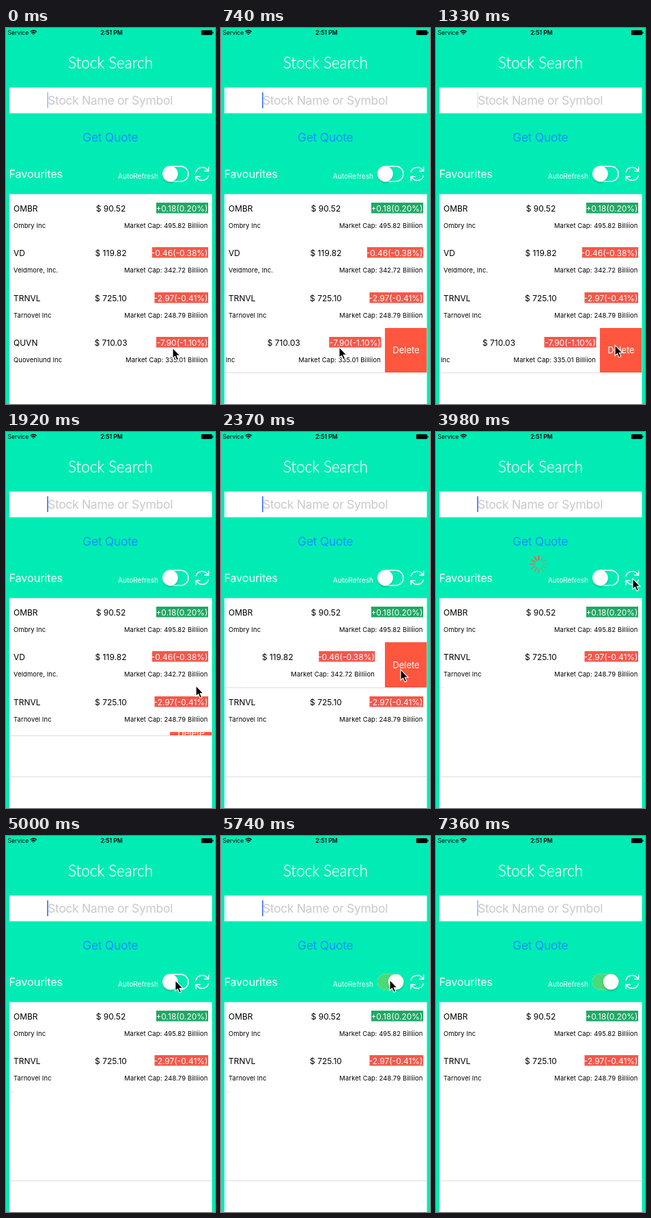
An HTML page that plays this animation: 306 px wide and 549 px high, repeating every 7.46 s.

```html
<!DOCTYPE html>
<html lang="en">
<head>
<meta charset="utf-8">
<title>Stock Search</title>
<style>
html, body { margin: 0; height: 100%; overflow: hidden; background: #00ecb4; }
svg { display: block; overflow: hidden; }
text { font-family: Inter, Roboto, sans-serif; white-space: pre; }
.title { font: 300 22.5px Lato, "Open Sans", sans-serif; fill: #fff; stroke: #fff; stroke-width: .3; }
.big { font-size: 17.6px; letter-spacing: -.02em; }
.row { font-size: 12px; }
.small { font-size: 9.45px; letter-spacing: .01em; }
.end { text-anchor: end; }
.mid { text-anchor: middle; }
.white { fill: #fff; }
.line { fill: none; stroke: #fff; stroke-width: 1.5; }
#thumb { filter: drop-shadow(0 2px 1.2px rgba(0, 0, 0, .2)); }
</style>
</head>
<body>
<svg id="stage" width="306" height="549" viewBox="0 0 306 549">
  <rect width="306" height="549" fill="#00ecb4"/>

  <text x="2.5" y="10" font-size="8.6">Service</text>
  <g fill="none" stroke="#000" stroke-width="1.4">
    <path d="M35.6 5.5Q40.2 1.6 44.8 5.5M37.3 7.4Q40.2 5 43.1 7.4"/>
    <path d="M40.2 10.2L38.8 8.7Q40.2 7.6 41.6 8.7Z" fill="#000" stroke="none"/>
  </g>
  <text class="mid" x="154.5" y="10" font-size="8.6" font-weight="600">2:51 PM</text>
  <rect x="285.8" y="3.3" width="16.2" height="6.9" rx="1"/>
  <rect x="302.4" y="5.6" width="1.2" height="2.6"/>

  <text class="title mid" x="153" y="59.3">Stock Search</text>
  <rect x="5" y="87" width="296.5" height="37.5" fill="#fff"/>
  <text class="big" x="61" y="112" fill="#c9c9cd">Stock Name or Symbol</text>
  <rect id="caret" x="60" y="94" width="2" height="23" fill="#5a86f6"/>
  <text class="big mid" x="152.7" y="166" fill="#128fff">Get Quote</text>

  <text class="white" x="4.5" y="219" font-size="16.2" letter-spacing="-.08">Favourites</text>
  <text class="white end" x="223" y="219.5" font-size="10" letter-spacing=".05">AutoRefresh</text>
  <rect class="line" x="229.7" y="202" width="37.3" height="22" rx="11"/>
  <rect id="track" x="229" y="201.3" width="38.7" height="23.4" rx="11.7" fill="#4cd977"/>
  <circle id="thumb" cy="213" r="11.2" fill="#fff"/>
  <g id="icon" class="line"></g>
  <g id="spinner" stroke="#f5603c" stroke-width="2.1" stroke-linecap="round"></g>

  <rect x="5" y="242.5" width="296.5" height="307" fill="#fff"/>
  <g id="rows"></g>
  <rect id="edge" x="5" height="1" fill="#dcdcde"/>
  <rect id="base" x="5" y="503" width="296.5" height="1" fill="#dcdcde"/>
  <path id="cursor" d="M0 0V15.5L3.5 12.3L6 18L8.7 16.8L6.2 11.3H11Z" fill="#000" stroke="#fff" stroke-width="1.1"/>
</svg>
<script>
const $ = id => document.getElementById(id);
const set = (el, attrs) => { for (const k in attrs) el.setAttribute(k, attrs[k]); };

const LOOP = 7460, STEP = 147.2, ROW = 65.25, TOP = 242, DELETE = 380;

// symbol, company, price, change, market cap, left edge of the change badge
const stocks = [
  ['OMBR', 'Ombry Inc', '90.52', '+0.18(0.20%)', '495.82', 215],
  ['VD', 'Veldmore, Inc.', '119.82', '-0.46(-0.38%)', '342.72', 209],
  ['TRNVL', 'Tarnovel Inc', '725.10', '-2.97(-0.41%)', '248.79', 212.5],
  ['QUVN', 'Quovenlund Inc', '710.03', '-7.90(-1.10%)', '335.01', 215]
];

// The delete button lies under the white sheet and shows as the sheet slides left.
$('rows').innerHTML = stocks.map(([symbol, company, price, change, cap, left]) => `
  <svg x="5" width="296.5">
    <g>
      <rect x="235" width="61.5" height="100%" fill="#ff5640"/>
      <text class="white mid" x="266" y="50%" dy=".36em" font-size="13">Delete</text>
    </g>
    <g>
      <rect width="296.5" height="66" fill="#fff"/>
      <text class="row" x="6" y="25.5">${symbol}</text>
      <text class="row mid" x="148.5" y="25.5">$ ${price}</text>
      <rect x="${left}" y="13" width="${291 - left}" height="15.5" fill="${change[0] === '+' ? '#20a865' : '#f4584c'}"/>
      <text class="row white end" x="290.5" y="25.5">${change}</text>
      <text class="small" x="6" y="49.7">${company}</text>
      <text class="small end" x="290.5" y="49.7">Market Cap: ${cap} Billiion</text>
    </g>
  </svg>`).join('');
const rows = [...$('rows').children];

$('icon').innerHTML = [0, 180].map(a =>
  `<path transform="rotate(${a} 287.3 213)" d="M278 210.6A9.6 9.6 0 0 1 295.6 208.4M296.6 202.4V209H290"/>`).join('');
$('spinner').innerHTML = Array.from({ length: 12 }, (_, i) =>
  `<path transform="translate(150.5 193) rotate(${i * 30})" d="M0 -6.8V-12.2"/>`).join('');
const petals = [...$('spinner').children];

// Each key is [time, ...values]; values move linearly between keys.
function at(t, keys) {
  const i = keys.findIndex(k => k[0] > t);
  if (i < 0) return keys[keys.length - 1].slice(1);
  if (!i) return keys[0].slice(1);
  const a = keys[i - 1], b = keys[i], p = (t - a[0]) / (b[0] - a[0]);
  return a.slice(1).map((v, j) => v + (b[j + 1] - v) * p);
}
const ramp = (t, start, length) => Math.min(1, Math.max(0, (t - start) / length));
const ease = p => .5 - .5 * Math.cos(Math.PI * p);
const show = yes => ({ visibility: yes ? 'visible' : 'hidden' });

const pointer = [
  [0, 244, 467], [150, 240, 467], [590, 168, 466], [880, 178, 466], [1320, 262, 463],
  [1640, 262, 463], [1980, 282, 348], [2208, 222, 346], [2350, 263, 347], [2800, 266, 344],
  [3090, 273, 313], [3500, 288, 214], [4420, 288, 214], [4900, 248, 211], [5740, 247, 210],
  [6350, 247, 210], [6500, 256, 246], [6920, 295, 526], [7060, 312, 556]
];
const swipes = {
  3: { drag: [[150, 0], [590, -68], [740, -61.5]], gone: 1600 },
  1: { drag: [[1980, 0], [2208, -52], [2350, -71], [2500, -61.5]], gone: 2820 }
};
const blinks = [-90, 1180, 2510, 3390, 4270, 5150, 6340, 7275];

function drawRows(t) {
  let y = TOP;
  const bottoms = rows.map((row, i) => {
    const swipe = swipes[i], [button, sheet] = row.children;
    let x = 0, height = ROW;
    if (swipe) {
      const p = ease(ramp(t, swipe.gone, DELETE));
      x = at(t, swipe.drag)[0] - 300 * ramp(p, 0, .7);
      height *= 1 - p;
    }
    const top = Math.round(y);
    y += height;
    set(row, { y: top, height: Math.round(y) - top, display: height > .1 ? 'inline' : 'none' });
    set(button, show(x));
    set(sheet, { transform: `translate(${x})` });
    set(sheet.firstElementChild, show(x));
    return Math.round(y);
  });

  const last = t < 1980 ? 3 : t < 2820 ? 1 : 2;
  set($('edge'), {
    y: bottoms[last],
    width: t < 2820 ? 235 : t < 3210 ? 296.5 : 6,
    ...show(t > 300 && t < 6400)
  });
  set($('base'), show(t > 1600));
}

function draw(t) {
  drawRows(t);

  const fade = blinks.map(b => at(t - b, [[0, 1], [150, .12], [380, .12], [530, 1]])[0]);
  set($('caret'), { opacity: Math.min(...fade) });

  const on = ease(ramp(t, 5300, 300));
  set($('track'), { opacity: on });
  set($('thumb'), { cx: 240.6 + 15.4 * on });

  set($('spinner'), show(t > 3800 && t < 4450));
  const lead = Math.floor((t - 3970) / 1000 * 12) + 24;
  petals.forEach((petal, i) => set(petal, { opacity: Math.max(.25, 1 - (lead - i) % 12 * .1) }));

  set($('cursor'), { transform: `translate(${at(t, pointer)})` });
}

// The screen refreshes in coarse steps, so time is rounded down to them.
const start = performance.now();
function tick() {
  const t = (performance.now() - start) % LOOP;
  draw(Math.floor(t / STEP + .05) * STEP);
  requestAnimationFrame(tick);
}
tick();
</script>
</body>
</html>
```
